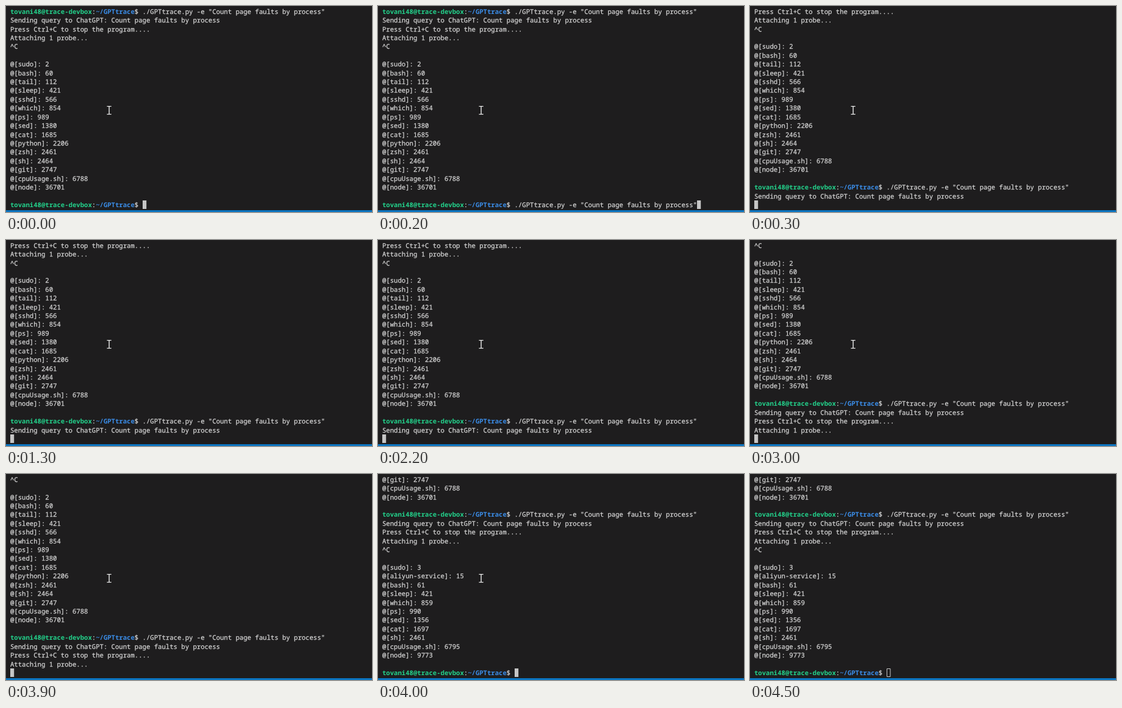
An HTML page with a canvas that plays this animation: 600x338 px, repeating every 4.6 s.

```html
<!DOCTYPE html>
<html lang="en">
<head>
<meta charset="utf-8">
<title>Terminal session</title>
<style>
  html, body { margin: 0; width: 100%; height: 100%; overflow: hidden; background: #1e1d1e; }
  canvas { display: block; }
</style>
</head>
<body>
<canvas id="screen" width="600" height="338"></canvas>
<script>
const ctx = document.getElementById('screen').getContext('2d');

const LOOP = 4600;
const LEFT = 7, TOP = 2, CELL_W = 6.37, CELL_H = 14.42, BASELINE = 10.7;
const LAST_ROW = 22;
const FONT = '10.62px "Noto Sans Mono", monospace';
const COLORS = { back: '#1e1d1e', text: '#d6d6d6', user: '#23d18b', path: '#3b8eea', cursor: '#c6c6c6', bar: '#0b74c0' };

const PROMPT = [
  ['tovani48@trace-devbox', COLORS.user, true],
  [':', COLORS.text],
  ['~/GPTtrace', COLORS.path, true],
  ['$ ', COLORS.text]
];
const COMMAND = [...PROMPT, ['./GPTtrace.py -e "Count page faults by process"', COLORS.text]];
const plain = text => [[text, COLORS.text]];
const counts = list => list.split(' ').map(item => {
  const [name, count] = item.split('=');
  return plain(`@[${name}]: ${count}`);
});

const run = list => [
  COMMAND,
  plain('Sending query to ChatGPT: Count page faults by process'),
  plain('Press Ctrl+C to stop the program....'),
  plain('Attaching 1 probe...'),
  plain('^C'),
  [],
  ...counts(list),
  []
];
const first = run('sudo=2 bash=60 tail=112 sleep=421 sshd=566 which=854 ps=989 sed=1380 cat=1685 ' +
  'python=2206 zsh=2461 sh=2464 git=2747 cpuUsage.sh=6788 node=36701');
const second = run('sudo=3 aliyun-service=15 bash=61 sleep=421 which=859 ps=990 sed=1356 cat=1697 ' +
  'sh=2461 cpuUsage.sh=6795 node=9773');

// Each step holds until the next; the last line always carries the cursor.
const STEPS = [
  { at: 0, lines: [...first, PROMPT] },
  { at: 100, lines: [...first, COMMAND] },
  { at: 300, lines: [...first, ...second.slice(0, 2), []] },
  { at: 2300, lines: [...first, ...second.slice(0, 4), []] },
  { at: 4000, lines: [...first, ...second, PROMPT] },
  { at: 4200, lines: [...first, ...second, PROMPT], unfocused: true }
];

function drawLine(line, row) {
  const y = TOP + row * CELL_H + BASELINE;
  let col = 0;
  for (const [text, color, bold] of line) {
    ctx.fillStyle = ctx.strokeStyle = color;
    ctx.font = (bold ? 'bold ' : '') + FONT;
    for (const char of text) {
      const x = LEFT + col++ * CELL_W;
      ctx.fillText(char, x, y);
      // A hairline outline gives the regular weight its slightly heavier stems.
      if (!bold) ctx.strokeText(char, x, y);
    }
  }
  return col;
}

function drawCursor(col, hollow) {
  const x = Math.round(LEFT + col * CELL_W), y = 319;
  if (hollow) {
    ctx.strokeStyle = COLORS.cursor;
    ctx.lineWidth = 1;
    ctx.strokeRect(x + 0.5, y + 0.5, 5.5, 13);
  } else {
    ctx.fillStyle = COLORS.cursor;
    ctx.fillRect(x, y, 6.2, 14);
  }
}

function drawPointer() {
  ctx.fillStyle = '#ececec';
  ctx.fillRect(168.4, 164.5, 1.4, 13);
  for (const y of [164, 177]) ctx.fillRect(165.5, y, 7.2, 1.2);
}

function draw(time) {
  const { lines, unfocused } = STEPS.findLast(step => step.at <= time);
  ctx.fillStyle = COLORS.back;
  ctx.fillRect(0, 0, 600, 338);
  ctx.lineWidth = 0.25;
  let col = 0;
  lines.slice(-LAST_ROW - 1).forEach((line, row) => { col = drawLine(line, row); });
  drawCursor(col, unfocused);
  if (!unfocused) drawPointer();
  ctx.fillStyle = COLORS.bar;
  ctx.fillRect(0, 335, 600, 3);
}

function tick() {
  draw(performance.now() % LOOP);
  requestAnimationFrame(tick);
}
ctx.textRendering = 'geometricPrecision';
ctx.lineJoin = 'round';
tick();
</script>
</body>
</html>
```
